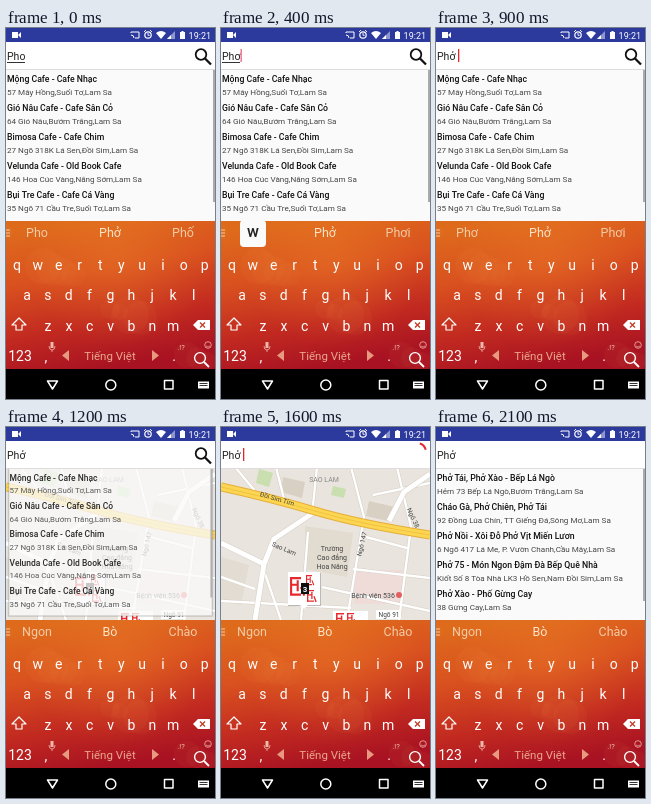
Write an HTML page with a canvas that moves like this. It is 209 px wide and 371 px high and loops after 2200 ms.

```html
<!DOCTYPE html>
<html lang="vi">
<head>
<meta charset="utf-8">
<style>
html, body { margin: 0; width: 100%; height: 100%; overflow: hidden; background: #000; }
canvas { display: block; width: 209px; height: 371px; }
</style>
</head>
<body>
<canvas id="stage"></canvas>
<script>
const W = 209, H = 371, LOOP = 2200, STEP = 100;
const canvas = document.getElementById('stage');
const ctx = canvas.getContext('2d');
const ratio = window.devicePixelRatio || 1;
canvas.width = W * ratio;
canvas.height = H * ratio;
ctx.scale(ratio, ratio);

const cafes = [
  ['Mộng Cafe - Cafe Nhạc', '57 Mây Hồng,Suối Tơ,Lam Sa'],
  ['Gió Nâu Cafe - Cafe Sân Cỏ', '64 Gió Nâu,Bướm Trắng,Lam Sa'],
  ['Bimosa Cafe - Cafe Chim', '27 Ngõ 318K Lá Sen,Đồi Sim,Lam Sa'],
  ['Velunda Cafe - Old Book Cafe', '146 Hoa Cúc Vàng,Nắng Sớm,Lam Sa'],
  ['Bụi Tre Cafe - Cafe Cá Vàng', '35 Ngõ 71 Cầu Tre,Suối Tơ,Lam Sa']
];
const noodles = [
  ['Phở Tái, Phở Xào - Bếp Lá Ngò', 'Hẻm 73 Bếp Lá Ngò,Bướm Trắng,Lam Sa'],
  ['Cháo Gà, Phở Chiên, Phở Tái', '92 Đồng Lúa Chín, TT Giếng Đá,Sông Mơ,Lam Sa'],
  ['Phở Nồi - Xôi Đỗ Phở Vịt Miến Lươn', '6 Ngõ 417 Lá Me, P. Vườn Chanh,Cầu Mây,Lam Sa'],
  ['Phở 75 - Món Ngon Đậm Đà Bếp Quê Nhà', 'Kiốt Số 8 Tòa Nhà LK3 Hồ Sen,Nam Đồi Sim,Lam Sa'],
  ['Phở Xào - Phố Gừng Cay', '38 Gừng Cay,Lam Sa']
];

function rect(x, y, w, h, color) {
  ctx.fillStyle = color;
  ctx.fillRect(x, y, w, h);
}

function text(s, x, y, size, color, align = 'left', weight = 400) {
  ctx.font = `${weight} ${size}px Roboto, "Noto Sans", sans-serif`;
  ctx.fillStyle = color;
  ctx.textAlign = align;
  ctx.fillText(s, x, y);
}

function tilted(s, x, y, degrees) {
  ctx.save();
  ctx.translate(x, y);
  ctx.rotate(degrees * Math.PI / 180);
  text(s, 0, 2, 6.5, '#444', 'center');
  ctx.restore();
}

function stroke(path, color, width) {
  ctx.strokeStyle = color;
  ctx.lineWidth = width;
  ctx.stroke(new Path2D(path));
}

function fill(path, color) {
  ctx.fillStyle = color;
  ctx.fill(new Path2D(path));
}

function circle(x, y, r, color, width) {
  ctx.beginPath();
  ctx.arc(x, y, r, 0, Math.PI * 2);
  if (width) {
    ctx.strokeStyle = color;
    ctx.lineWidth = width;
    ctx.stroke();
  } else {
    ctx.fillStyle = color;
    ctx.fill();
  }
}

function statusBar() {
  rect(0, 0, W, 14, '#2c3a9e');
  fill('M6 4h6v6h-6zM12 7l3-3v6z', '#fff');
  stroke('M125 5v-1h8v6h-4M125 7q3 0 3 3', '#fff', 1);
  circle(142, 7, 3.2, '#fff', 1.2);
  stroke('M142 5v2.3h1.7M138 4l2-2M146 4l-2-2', '#fff', 0.9);
  fill('M150 5q5-4 10 0l-5 6z', '#fff');
  fill('M161 11h8v-8z', '#8e96cc');
  fill('M161 11h4v-4z', '#fff');
  fill('M174 4h1.5v-1h2v1h1.5v7h-5z', '#fff');
  text('19:21', 205, 10.5, 9, '#fff', 'right');
}

function searchField(t) {
  rect(0, 14, W, 28, '#fff');
  rect(0, 41, W, 1, '#ddd');
  const word = t < 300 ? 'Pho' : t < 700 ? 'Phơ' : 'Phở';
  text(word, 1, 32, 10.5, '#222');
  if (t < 700) rect(1, 34, 18, 1, '#333');
  if (t >= 300 && t < 1000 || t >= 1500 && t < 2000) {
    rect(t < 700 ? 19.5 : 22, 21, 1.3, 13, t < 700 ? '#f06088' : '#e5252d');
  }
  if (t < 1300) {
    circle(195, 26.5, 5.3, '#111', 1.8);
    stroke('M199 30.5l6 6', '#111', 2.3);
  } else if (t < 1900) {
    const a = (t - 1600) / 320 - 1.25;
    ctx.beginPath();
    ctx.arc(196, 25, 9, a, a + 1);
    ctx.strokeStyle = '#e52a35';
    ctx.lineWidth = 2;
    ctx.stroke();
  }
}

function bowl(x, y, s) {
  ctx.save();
  ctx.translate(x, y);
  ctx.scale(s, s);
  stroke('M0 1h10M1 1v16M1 7h6M1 16h9M7 3v10M10 9l3 8', '#e8282c', 1.9);
  ctx.restore();
}

function map() {
  rect(0, 40, W, 154, '#e9e4dd');
  fill('M84 99L132 106L126 150L84 142z', '#e2dbd0');
  fill('M133 143h48v34h-48z', '#efdcd9');
  fill('M0 130l28 8l-8 40l-20-6z', '#e2dcd3');
  fill('M38 42l14 4l-4 14l-13-4zM112 59l13 3l-2 9l-13-3z', '#c9dfb0');
  fill('M62 50l22 5l-3 16l-21-6zM148 74l26 6l-3 15l-26-6z', '#d9d0c4');

  const lanes = 'M14 40L34 64M40 135L60 193M96 40L91 88M87 105L80 193' +
    'M130 40L143 90L126 193M132 142L209 151M176 40L190 100L178 193M101 160L209 184' +
    'M0 174L130 181M0 150L34 162M55 40L64 76M152 68L209 56M145 110L186 121';
  const streets = 'M34 193L43 137L53 112L92 86M0 116L43 137M209 47L183 65L168 94';
  ctx.lineJoin = 'round';
  stroke(lanes, '#d5cec4', 3.4);
  stroke(lanes, '#fff', 2.4);
  stroke(streets, '#d5cec4', 6);
  stroke(streets, '#fff', 5);
  const main = 'M0 60Q50 71 94 84T209 108';
  stroke(main, '#e6ae3c', 9);
  stroke(main, '#fcd650', 7);
  stroke(main, '#eebb42', 0.8);

  text('SAO LAM', 103, 55, 7, '#888', 'center');
  tilted('Đồi Sim Tím', 56, 72, 16);
  tilted('Sao Lam', 63, 122, 23);
  ['Trường', 'Cao đẳng', 'Hoa Nắng'].forEach((s, i) =>
    text(s, 111, 124 + i * 9, 7, '#444', 'center'));
  tilted('Ngõ 147', 141, 117, -77);
  tilted('Ngõ 38', 192, 91, 65);
  text('Bệnh viện 536', 152, 171, 7, '#444', 'center');
  circle(178, 168, 3, '#e36060');
  rect(155, 183, 25, 9, '#fff');
  text('Ngõ 91', 168, 190, 6.5, '#444', 'center');

  rect(67, 146, 33, 33, '#b9b9b9');
  fill('M67 145h32v33h-12l-4 4l-4-4h-12z', '#fff');
  bowl(69, 150, 1.1);
  bowl(85, 148, 0.6);
  bowl(86, 163, 0.7);
  rect(80, 156, 8, 11, '#111');
  text('3', 84, 165, 8, '#fff', 'center', 700);
  rect(112, 184, 35, 10, '#fff');
  bowl(115, 186, 0.8);
  bowl(126, 186, 0.7);
}

function list(rows, alpha, scale) {
  ctx.save();
  ctx.beginPath();
  ctx.rect(0, 40, W, 153);
  ctx.clip();
  ctx.translate(104, 34);
  ctx.scale(scale, scale);
  ctx.translate(-104, -34);
  ctx.globalAlpha = alpha;
  rect(0, 40, W, 153, '#fafafa');
  if (scale < 1) stroke('M0 40V193H209V40', '#0003', 1.5);
  ctx.globalAlpha = Math.sqrt(alpha);
  rows.forEach(([name, place], i) => {
    const y = 54 + i * 29.1;
    text(name, 1, y, 8.7, '#111', 'left', 500);
    text(place, 1, y + 13, 8.1, '#444');
  });
  rect(207, 41, 2, 133, '#aaa');
  ctx.restore();
}

function keyRow(keys, x, y) {
  [...keys].forEach((k, i) => text(k, x + i * 20.85, y, 14, '#fff', 'center'));
}

function keyboard(t) {
  const bg = ctx.createLinearGradient(70, 193, 96, 341);
  bg.addColorStop(0, '#de6a1c');
  bg.addColorStop(0.35, '#d9511f');
  bg.addColorStop(0.7, '#c22a20');
  bg.addColorStop(1, '#a81222');
  rect(0, 193, W, 148, bg);
  ctx.save();
  ctx.beginPath();
  ctx.rect(0, 193, W, 148);
  ctx.clip();
  const glow = ctx.createRadialGradient(112, 230, 5, 112, 230, 90);
  glow.addColorStop(0, '#f5902a44');
  glow.addColorStop(1, '#f5902a00');
  rect(0, 193, W, 148, glow);
  for (let i = 0; i < 12; i++) {
    circle(i * 67 % 211, 204 + i * 43 % 132, 7 + i * 5 % 13, '#ffb05a0c');
  }
  ctx.restore();

  const words = t < 300 ? ['Pho', 'Phở', 'Phố']
    : t < 1000 ? ['Phơ', 'Phở', 'Phơi'] : ['Ngon', 'Bò', 'Chào'];
  words.forEach((s, i) =>
    text(s, 31 + i * 73, 209, 12.5, i === 1 ? '#fbe4c8' : '#f3cba6', 'center'));
  stroke('M0 202h4M0 205h4M0 208h4', '#f3cba6', 1);

  keyRow('qwertyuiop', 11, 242);
  keyRow('asdfghjkl', 21, 272);
  keyRow('zxcvbnm', 42, 303);
  stroke('M13 290l-7 7h4v5h6v-5h4z', '#fff', 1.2);
  fill('M187 297l5-5h12v10h-12z', '#fff');
  stroke('M194 294.5l5 5M199 294.5l-5 5', '#c43a25', 1.3);

  text('123', 14, 333, 14, '#fff', 'center');
  text(',', 40, 334, 14, '#fff', 'center');
  fill('M44.5 314h3v6h-3z', '#eeb9ac');
  stroke('M43 318q0 4 3 4t3-4M46 322v2', '#eeb9ac', 0.8);
  fill('M63 322v11l-7-5.5zM146 322v11l7-5.5z', '#e79a80');
  text('Tiếng Việt', 104, 332, 11.5, '#eaa78e', 'center');
  text('.', 168, 333, 14, '#fff', 'center');
  text('.!?', 175, 322, 7.5, '#eeb9ac', 'center');
  circle(202, 317, 3.3, '#eeb9ac', 0.8);
  stroke('M200 318q2 2 4 0', '#eeb9ac', 0.7);
  circle(194, 330, 5.4, '#fff', 1.4);
  stroke('M198 334l5 5', '#fff', 1.8);

  if (t >= 300 && t < 500) {
    ctx.beginPath();
    ctx.roundRect(19, 192, 26, 27, 4);
    ctx.fillStyle = '#fafafa';
    ctx.fill();
    text('w', 32, 209, 16, '#222', 'center', 500);
  }
}

function navBar() {
  rect(0, 341, W, 30, '#000');
  stroke('M41.5 353h10l-5 8z', '#fff', 1.5);
  circle(104.8, 357, 5, '#fff', 1.5);
  stroke('M158.5 352.5h8.5v8.5h-8.5z', '#fff', 1.5);
  rect(192, 353.5, 11, 7, '#fff');
  stroke('M193.5 355.5h8M193.5 357.5h8', '#000', 0.8);
}

function draw(t) {
  map();
  if (t < 1200) list(cafes, 1, 1);
  else if (t < 1400) list(cafes, t < 1300 ? 0.78 : 0.25, t < 1300 ? 0.975 : 0.96);
  else if (t >= 1800) {
    const k = Math.min(2, (t - 1800) / STEP);
    list(noodles, [0.25, 0.68, 1][k], [0.96, 0.975, 1][k]);
  }
  searchField(t);
  statusBar();
  keyboard(t);
  navBar();
}

const start = performance.now();
function tick() {
  const t = (performance.now() - start) % LOOP;
  draw(Math.floor(t / STEP) * STEP);
  requestAnimationFrame(tick);
}
tick();
</script>
</body>
</html>
```
